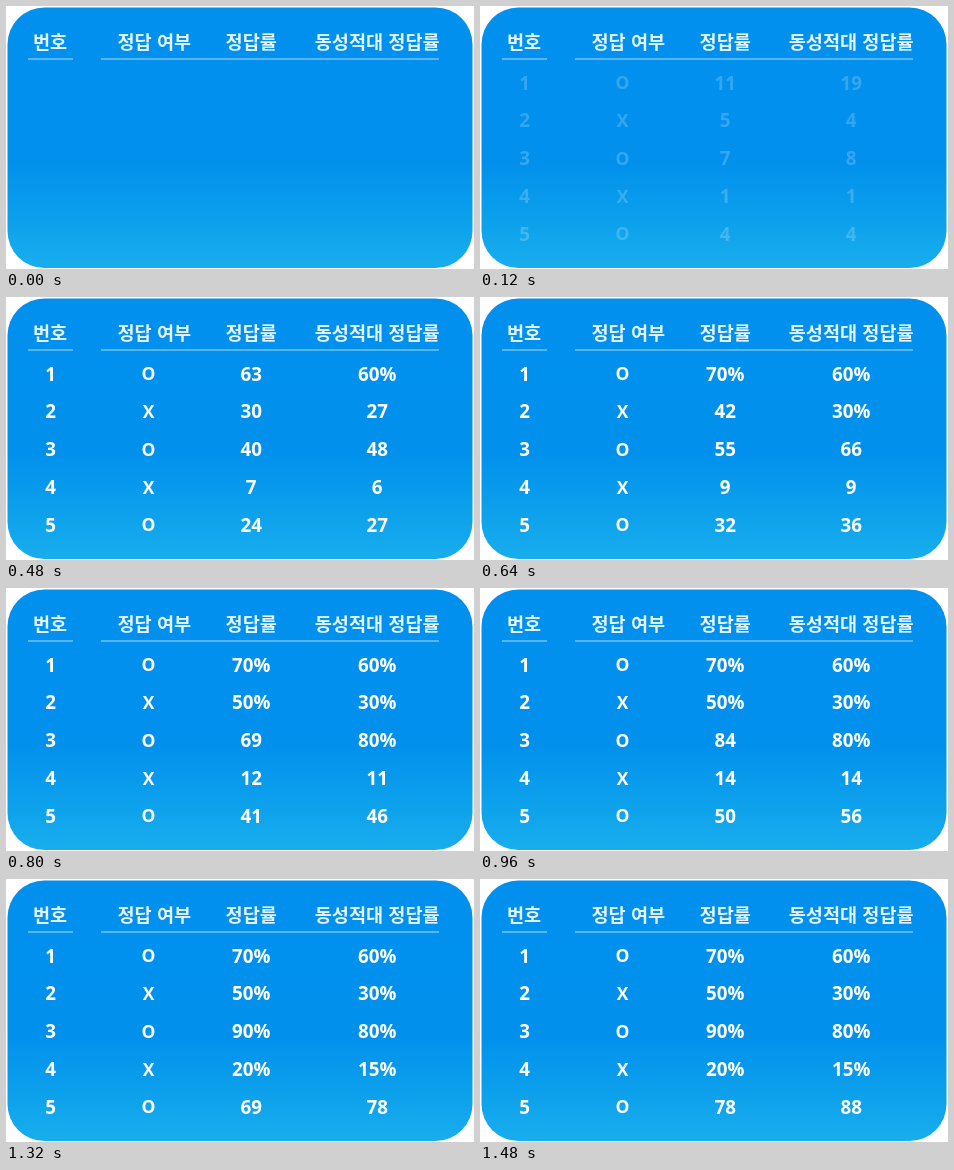
An HTML page for the animation above (1.52 s loop, 468 px wide and 263 px high).

```html
<!DOCTYPE html>
<html lang="ko">
<head>
<meta charset="utf-8">
<style>
  html, body { margin: 0; width: 100%; height: 100%; overflow: hidden; background: #fff; }
  svg { display: block; width: 468px; height: 263px; }
  text { text-anchor: middle; fill: #fff; }
  .head text { font: 600 18.6px "Noto Sans CJK KR", "Noto Sans CJK", sans-serif; fill: #e2f3fe; }
  .body text { font: 600 18.8px "Noto Sans", sans-serif; }
  .body .mark { font-size: 17.5px; }
  .head path { stroke: #fff; stroke-opacity: .45; stroke-width: 1.3; }
</style>
</head>
<body>
<svg viewBox="0 0 468 263">
  <defs>
    <linearGradient id="sky" x1="0" y1="0" x2="0" y2="1">
      <stop offset="0" stop-color="#0190ee"/>
      <stop offset=".6" stop-color="#0191ed"/>
      <stop offset=".8" stop-color="#0c9fec"/>
      <stop offset="1" stop-color="#18aeed"/>
    </linearGradient>
  </defs>
  <rect x="1.5" y="1.5" width="465" height="260.5" rx="37" fill="url(#sky)"/>
  <g class="head">
    <text x="44" y="42.8">번호</text>
    <text x="148.3" y="42.8">정답 여부</text>
    <text x="245.2" y="42.8">정답률</text>
    <text x="371.2" y="42.8">동성적대 정답률</text>
    <path d="M22 53H67M95 53H433"/>
  </g>
  <g class="body"></g>
</svg>
<script>
const STEP = 40, LOOP = 1520, FADE_STEPS = 10;
const body = document.querySelector('.body');
const counters = [];

// mark, then [final percentage, steps needed to reach it] for both columns
const rows = [
  ['O', [70, 12.15], [60, 6.1]],
  ['X', [50, 17.8], [30, 12.1]],
  ['O', [90, 24.45], [80, 18.1]],
  ['X', [20, 30.9], [15, 24]],
  ['O', [80, 36.6], [90, 36.6]]
];

function addText(x, y, content = '', name = '') {
  const el = document.createElementNS('http://www.w3.org/2000/svg', 'text');
  el.setAttribute('x', x);
  el.setAttribute('y', y);
  el.setAttribute('class', name);
  el.textContent = content;
  return body.appendChild(el);
}

rows.forEach(([mark, ...cells], i) => {
  const y = 83.6 + i * 37.75;
  addText(44.5, y, i + 1);
  addText(142.5, y - .3, mark, 'mark');
  cells.forEach(([goal, steps], c) =>
    counters.push({ el: addText([245.2, 371.2][c], y), goal, steps }));
});

function draw(now) {
  const step = Math.floor(now % LOOP / STEP) - 1;
  body.setAttribute('opacity', Math.min(1, Math.max(0, step / FADE_STEPS)));
  for (const { el, goal, steps } of counters) {
    el.textContent = step >= steps ? goal + '%' : Math.max(0, Math.floor(goal * step / steps));
  }
}

function tick() {
  draw(performance.now());
  requestAnimationFrame(tick);
}
tick();
</script>
</body>
</html>
```
